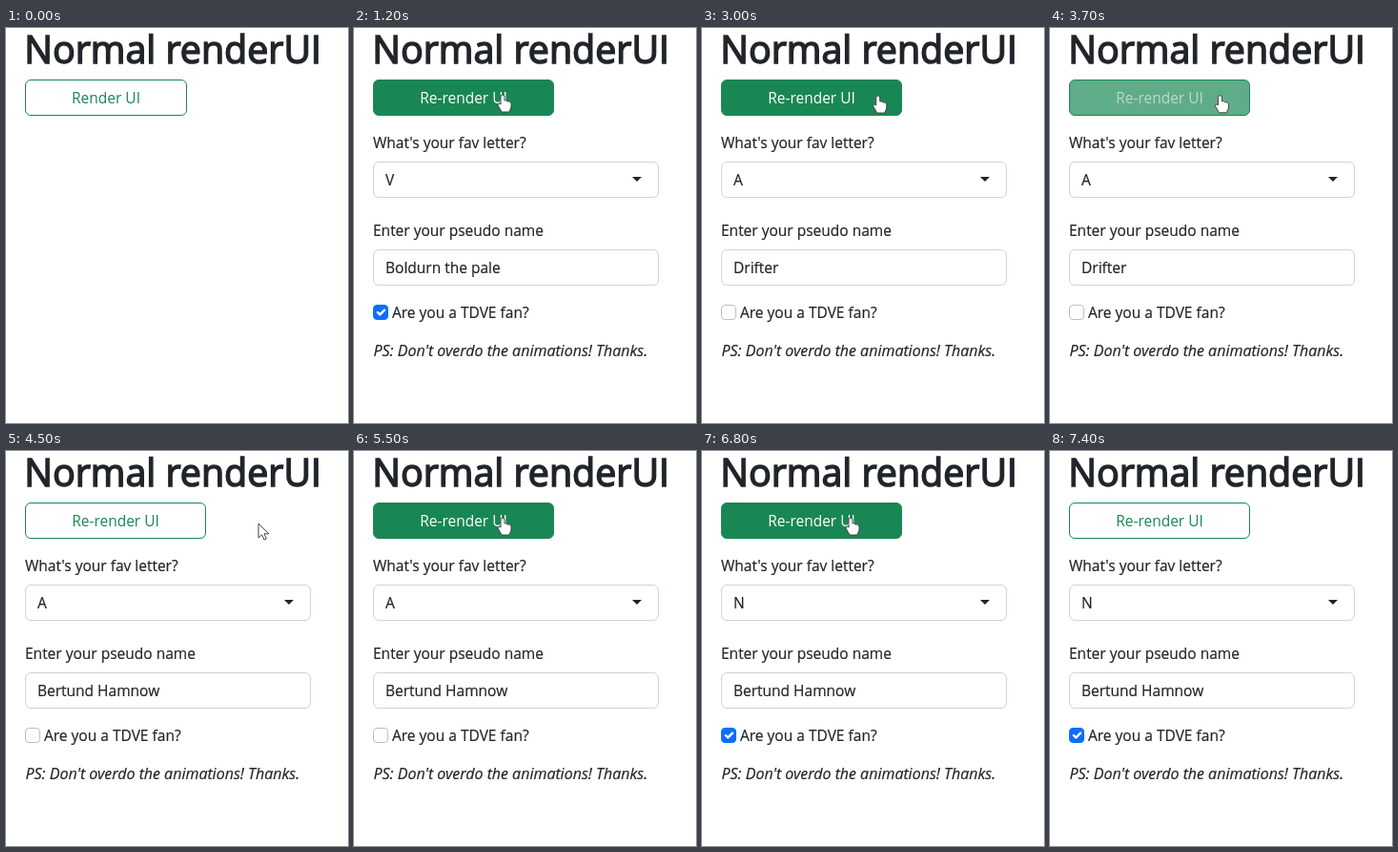
These frames come from a looping animation (359 px wide and 414 px high, 8000 ms). An HTML page:

```html
<!DOCTYPE html>
<html lang="en">
<head>
<meta charset="utf-8">
<title>Normal renderUI</title>
<style>
  html, body { margin: 0; width: 100%; height: 100%; overflow: hidden; background: #fff; }
  svg { display: block; font: 15.5px "Open Sans", sans-serif; fill: #212529; }
  .title { font-size: 39.4px; stroke: #212529; stroke-width: 1.5; }
  .note { font-size: 16px; font-style: italic; }
  .field { fill: #fff; stroke: #ced4da; }
  #form text { stroke: #212529; stroke-width: .2; }
  #button { stroke: #198754; }
  #caption { text-anchor: middle; }
  #tick { fill: none; stroke: #fff; stroke-width: 2.4; stroke-linecap: round; stroke-linejoin: round; }
  #cursor path { fill: #fff; stroke: #444; stroke-linejoin: round; }
</style>
</head>
<body>
<svg width="359" height="414" viewBox="0 0 359 414">
  <text class="title" x="19.2" y="36.5">Normal renderUI</text>
  <rect id="button" x="20.5" y="54.5" height="37" rx="5.5"/>
  <text id="caption" y="79"></text>
  <g id="form">
    <text x="20" y="126">What's your fav letter?</text>
    <rect class="field" x="20.5" y="140.5" width="299" height="37" rx="5.5"/>
    <text id="letter" x="33" y="165"></text>
    <path d="M292 156h10l-5 5z"/>
    <text x="20" y="218">Enter your pseudo name</text>
    <rect class="field" x="20.5" y="232.5" width="299" height="37" rx="5.5"/>
    <text id="pseudo" x="33" y="257"></text>
    <rect id="box" x="20.5" y="290.5" width="15" height="15" rx="3.5"/>
    <path id="tick" d="M24.8 298l2.4 2.4 4.8-4.8"/>
    <text x="40" y="304">Are you a TDVE fan?</text>
    <text class="note" x="20.5" y="344">PS: Don't overdo the animations! Thanks.</text>
  </g>
  <g id="cursor">
    <path id="hand" d="M-2 1Q-2-1 0-1T2 1V5Q4 4 5 6Q9 5 9 8V12L7 17H-1L-5 10Q-5 7-2 9Z"/>
    <path id="arrow" d="M0 0V15L3.6 11.8L6 17L8.4 16L6 10.8H11Z"/>
  </g>
</svg>
<script>
const LOOP = 8000, STEP = 100, FADE = 150;
const APPEAR = 100, VANISH = 7400;
const ENTRY = [281, 288], SPOT = [156, 71], EXIT = [259, 378];

// Each click renders a new form; then the pointer wanders off to `away`
const visits = [
  { click: 1100, away: [271, 115], letter: "V", pseudo: "Boldurn the pale", fan: true },
  { click: 2900, away: [267, 75], letter: "A", pseudo: "Drifter", fan: false },
  { click: 4300, away: [265, 76], letter: "A", pseudo: "Bertund Hamnow", fan: false },
  { click: 5600, away: [302, 80], letter: "Z", pseudo: "Drifter", fan: true },
  { click: 6800, away: [321, 175], letter: "N", pseudo: "Bertund Hamnow", fan: true },
];

// Pointer moves at a steady rhythm: off the button, back again, finally out
const moves = [{ start: APPEAR, duration: 800, to: SPOT }];
visits.forEach(({ away }, i) => {
  const leave = 1600 + 1300 * i;
  const back = i < visits.length - 1;
  moves.push({ start: leave, duration: 300, to: away });
  moves.push(back ? { start: leave + 480, duration: 450, to: SPOT }
                  : { start: leave + 200, duration: 300, to: EXIT });
});

const $ = id => document.getElementById(id);
const ease = u => { u = Math.min(1, Math.max(0, u)); return u * u * (3 - 2 * u); };
const lerp = (from, to, u) => from.map((v, i) => v + (to[i] - v) * u);
const rgb = (from, to, u) => `rgb(${lerp(from, to, u).map(Math.round)})`;
const show = (id, visible) => $(id).setAttribute("visibility", visible ? "visible" : "hidden");

const pointerAt = t => moves.reduce(
  (point, { start, duration, to }) => lerp(point, to, ease((t - start) / duration)), ENTRY);
const visitAt = t => visits.filter(visit => visit.click <= t).pop();
const buttonWidth = t => visitAt(t) ? 190 : 170;

function isOver(t) {
  const [x, y] = pointerAt(t);
  return x > 20 && x < 20 + buttonWidth(t) && y > 54 && y < 92;
}

// The fill follows the share of the last FADE ms spent over the button
function hoverAmount(t) {
  let time = 0;
  for (let ago = 0; ago < FADE; ago += 5) if (isOver(t - ago)) time += 5;
  return ease(time / FADE);
}

function drawButton(t) {
  const width = buttonWidth(t), hover = hoverAmount(t);
  const green = [25, 135, 84], white = [255, 255, 255];
  $("button").setAttribute("width", width - 1);
  $("button").setAttribute("fill", rgb(white, green, hover));
  $("caption").setAttribute("x", 20 + width / 2);
  $("caption").setAttribute("fill", rgb(green, white, hover));
  $("caption").textContent = visitAt(t) ? "Re-render UI" : "Render UI";
}

function drawForm(visit) {
  show("form", visit);
  show("tick", visit && visit.fan);
  if (!visit) return;
  $("letter").textContent = visit.letter;
  $("pseudo").textContent = visit.pseudo;
  $("box").setAttribute("fill", visit.fan ? "#0d6efd" : "#fff");
  $("box").setAttribute("stroke", visit.fan ? "#0d6efd" : "#bfbfbf");
}

function drawCursor(t) {
  const visible = t >= APPEAR && t < VANISH, over = isOver(t);
  show("hand", visible && over);
  show("arrow", visible && !over);
  $("cursor").setAttribute("transform", `translate(${pointerAt(t)})`);
}

function draw(now) {
  const t = Math.floor(now % LOOP / STEP) * STEP;
  drawButton(t);
  drawForm(visitAt(t));
  drawCursor(t);
}

const start = performance.now();
function tick() {
  draw(performance.now() - start);
  requestAnimationFrame(tick);
}
tick();
</script>
</body>
</html>
```
